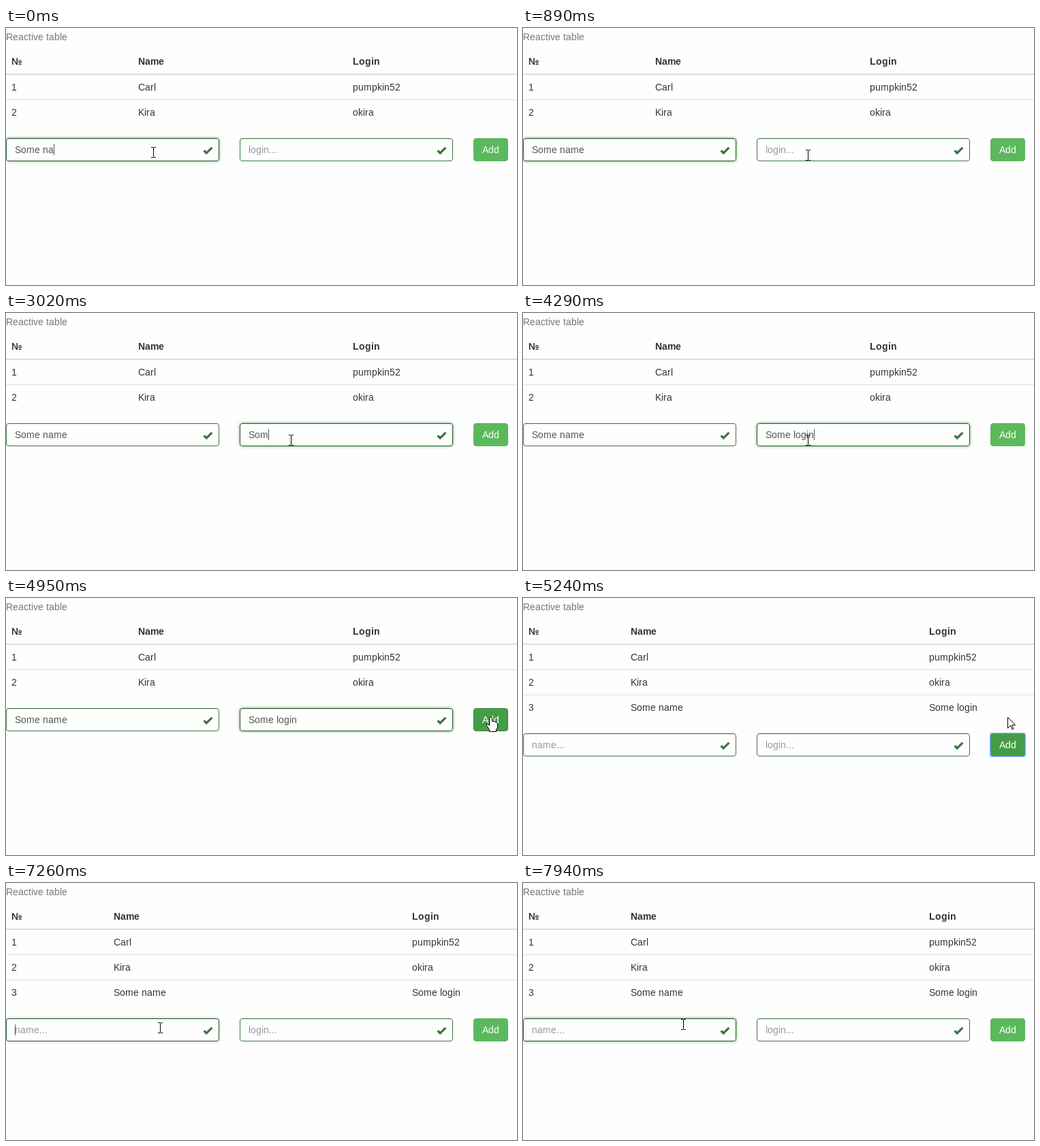
These frames come from a looping animation (750x378 px, 8 s). An HTML page with a canvas:

```html
<!DOCTYPE html>
<html lang="en">
<head>
<meta charset="utf-8">
<title>Reactive table</title>
<style>
  html, body { margin: 0; width: 100%; height: 100%; overflow: hidden; background: #fefefe; }
  canvas { display: block; }
</style>
</head>
<body>
<canvas id="stage" width="750" height="378"></canvas>
<script>
const ctx = document.getElementById('stage').getContext('2d', { alpha: false });
const LOOP = 8000, LOGIN_FOCUS = 1040, ADDED = 5240, NAME_FOCUS = 7260;
const FADE = 120, KEY_GAP = 142, BLINK = 530, POINTER_GAP = 139;
const PAPER = '#fefefe', GREEN = '#3c763d', DARK_GREEN = '#2b542c';

const people = [['1', 'Carl', 'pumpkin52'], ['2', 'Kira', 'okira'], ['3', 'Some name', 'Some login']];

// Typing comes in bursts of evenly spaced keys.
const nameBursts = [{ start: 140, keys: 2 }];
const loginBursts = [{ start: 2430, keys: 2 }, { start: 3020, keys: 3 }, { start: 3720, keys: 5 }];

// [pointer step, x, y]: close points join into one sweep, otherwise the pointer rests.
const pointerPath = [[0, 216, 183], [5, 354, 177], [6, 418, 187], [34, 539, 170], [35, 711, 175],
  [47, 706, 176], [49, 274, 204], [51, 226, 213], [57, 235, 208]];

const clamp = value => Math.min(1, Math.max(0, value));

function pressed(bursts, t) {
  const count = ({ start, keys }) => Math.min(keys, Math.max(0, Math.floor((t - start) / KEY_GAP) + 1));
  return bursts.reduce((sum, burst) => sum + count(burst), 0);
}

// The caret shows while keys arrive, then blinks.
function caretShown(t) {
  const keyTimes = [...nameBursts, ...loginBursts].flatMap(({ start, keys }) =>
    Array.from({ length: keys }, (_, i) => start + i * KEY_GAP));
  const events = [0, LOGIN_FOCUS, LOGIN_FOCUS + FADE, NAME_FOCUS, NAME_FOCUS + FADE, ...keyTimes];
  const latest = Math.max(...events.filter(time => time <= t));
  return Math.floor((t - latest) / BLINK) % 2 === 0;
}

function pointerAt(t) {
  const step = Math.max(0, Math.floor((t - 15) / POINTER_GAP));
  const index = pointerPath.findLastIndex(point => point[0] <= step);
  const [start, x, y] = pointerPath[index];
  const [end, nextX, nextY] = pointerPath[index + 1] || pointerPath[index];
  const p = end > start && end - start <= 2 ? (step - start) / (end - start) : 0;
  return [Math.round(x + (nextX - x) * p), Math.round(y + (nextY - y) * p)];
}

// Glyphs advance by whole pixels; returns the end position.
function text(string, x, baseline, color = '#333', weight = 'normal') {
  ctx.font = `${weight} 14px "Liberation Sans", Arial, sans-serif`;
  ctx.fillStyle = color;
  for (const char of string) {
    ctx.fillText(char, x, baseline);
    x += Math.round(ctx.measureText(char).width);
  }
  return x;
}

function rect(x, y, w, h, color) {
  ctx.fillStyle = color;
  ctx.fillRect(x, y, w, h);
}

function roundBox(x, y, w, h, fill, stroke) {
  ctx.beginPath();
  ctx.roundRect(x + .5, y + .5, w - 1, h - 1, 3.5);
  ctx.fillStyle = fill;
  ctx.fill();
  ctx.strokeStyle = stroke;
  ctx.lineWidth = 1;
  ctx.stroke();
}

function polygon(points, x, y, fill, stroke) {
  ctx.beginPath();
  points.forEach(([px, py]) => ctx.lineTo(x + px, y + py));
  ctx.closePath();
  ctx.fillStyle = fill;
  ctx.fill();
  if (!stroke) return;
  ctx.strokeStyle = stroke;
  ctx.lineWidth = 1;
  ctx.stroke();
}

function table(added) {
  const columns = added ? [8, 158, 596] : [8, 194, 509];
  const row = (cells, y, weight) => cells.forEach((cell, i) => text(cell, columns[i], y, '#333', weight));
  text('Reactive table', 0, 18, '#777');
  row(['№', 'Name', 'Login'], 54, 'bold');
  rect(0, 67, 750, 2, '#ddd');
  people.slice(0, added ? 3 : 2).forEach((cells, i) => {
    if (i) rect(0, 68 + 37 * i, 750, 1, '#ddd');
    row(cells, 92 + 37 * i);
  });
}

function field(x, y, value, hint, glow, caret) {
  ctx.save();
  ctx.globalAlpha = glow;
  ctx.shadowColor = '#67b168';
  ctx.shadowBlur = 4.5;
  ctx.beginPath();
  ctx.roundRect(x, y, 313, 34, 4);
  ctx.fillStyle = PAPER;
  ctx.fill();
  ctx.restore();

  roundBox(x, y, 313, 34, PAPER, glow >= .5 ? DARK_GREEN : GREEN);
  rect(x + 3, y + 1, 307, 1, 'rgba(0,0,0,.075)');
  const end = text(value, x + 13, y + 22, '#555');
  if (!value) text(hint, x + 13, y + 22, '#999');
  if (caret) rect(end, y + 9, 1, 16, '#555');

  const check = [[.4, 6.8], [2.8, 4.5], [5.4, 6.8], [12.2, 0], [14.5, 2.3], [5.2, 11.6]];
  polygon(check, x + 289, y + 12.7, GREEN);
}

function button(y, hovered, focused) {
  const color = hovered || focused ? '#449d44' : '#5cb85c';
  roundBox(686, y, 51, 34, color, hovered ? '#398439' : color);
  if (focused) {
    ctx.beginPath();
    ctx.roundRect(686, y, 51, 34, 2);
    ctx.strokeStyle = 'rgba(77,144,254,.6)';
    ctx.lineWidth = 2;
    ctx.stroke();
  }
  text('Add', 699, y + 22, '#fff');
}

function beam(x, y) {
  for (const end of [y - 8, y + 7]) {
    rect(x - 3, end, 3, 1, '#000');
    rect(x + 1, end, 3, 1, '#000');
  }
  rect(x, y - 7, 1, 14, '#000');
}

function arrow(x, y) {
  const outline = [[0, 0], [0, 16], [4, 12], [6.5, 18], [8.5, 17], [6, 11.5], [11, 11.5]];
  polygon(outline, x + .5, y + .5, '#fff', '#000');
}

function hand(x, y) {
  const outline = [[-1, 0], [1, 0], [2, 1], [2, 6], [5, 6], [9, 8], [10, 9], [10, 15], [8, 18], [8, 21],
    [-2, 21], [-2, 18], [-6, 12], [-6, 10], [-4, 10], [-2, 12], [-2, 1]];
  polygon(outline, x + .5, y + .5, '#fff', '#000');
}

function draw(t) {
  const added = t >= ADDED;
  const top = added ? 199 : 162;
  const [x, y] = pointerAt(t);
  const inRow = y >= top && y < top + 34;
  const overButton = inRow && x >= 686 && x < 737;

  const name = added ? '' : 'Some name'.slice(0, 7 + pressed(nameBursts, t));
  const login = added ? '' : 'Some login'.slice(0, pressed(loginBursts, t));
  const toLogin = clamp((t - LOGIN_FOCUS + FADE / 2) / FADE);
  const nameGlow = added ? clamp((t - NAME_FOCUS + FADE / 2) / FADE) : 1 - toLogin;
  const caret = caretShown(t);
  const nameFocused = t < LOGIN_FOCUS || t >= NAME_FOCUS;
  const buttonFocused = added && t < NAME_FOCUS;

  rect(0, 0, 750, 378, PAPER);
  table(added);
  field(0, top, name, 'name...', nameGlow, caret && nameFocused);
  field(343, top, login, 'login...', added ? 0 : toLogin, caret && !nameFocused && !added);
  button(top, overButton, buttonFocused);

  const pointer = overButton ? hand : inRow && x < 656 ? beam : arrow;
  pointer(x, y);
}

function tick() {
  draw(performance.now() % LOOP);
  requestAnimationFrame(tick);
}
tick();
</script>
</body>
</html>
```
